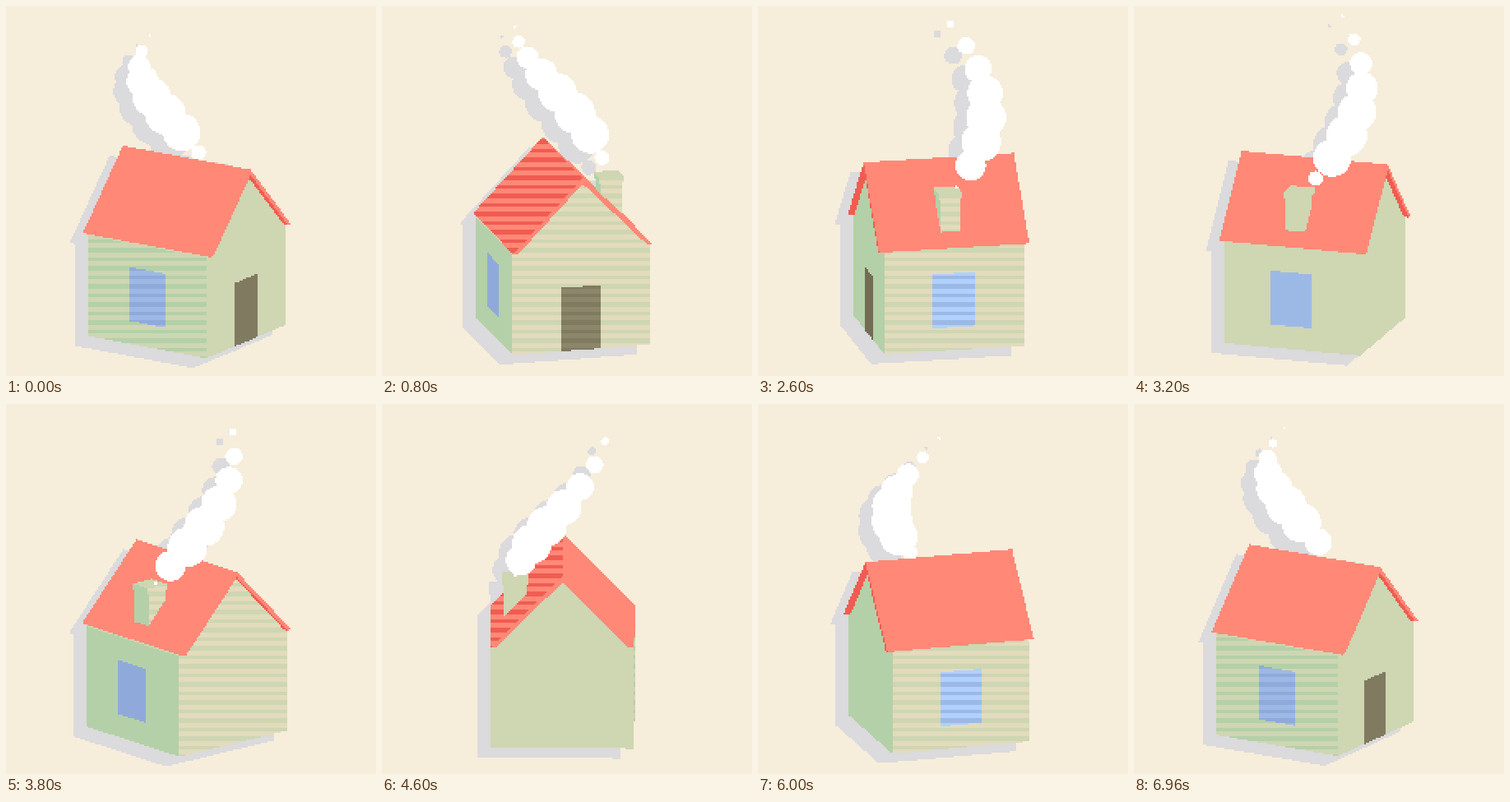
Recreate the animation shown at these times as an HTML page with a canvas. Size 450 px wide and 450 px high, loop 7 s.

```html
<!DOCTYPE html>
<html>
<head>
<meta charset="utf-8">
<title>Little house</title>
<style>
  html, body { margin: 0; width: 100%; height: 100%; overflow: hidden; background: #f6eddb; }
  canvas { display: block; width: 450px; height: 450px; image-rendering: pixelated; }
</style>
</head>
<body>
<canvas id="view" width="225" height="225"></canvas>
<script>
const LOOP = 7000, STEP = 40, PX = 2, N = 225;
const CX = 219.8, CY = 394.5, TILT = 0.28, UP = 0.96;
const STRIPE = 11, STRIPE_SHIFT = 2.75;
const TURN = 2 * Math.PI / LOOP, START = 56.2 * Math.PI / 180;
const LIGHT = 28 * Math.PI / 180;

const rgb = hex => {
  const n = parseInt(hex, 16);
  return (255 << 24 | (n & 255) << 16 | (n & 0xff00) | n >> 16) >>> 0;
};
const BG = rgb('f6eddb'), SHADOW = rgb('dbdadc'), WHITE = rgb('ffffff');
// dark, middle, light
const WALL = ['b4d0a8', 'ced6b2', 'e2dbbc'].map(rgb);
const GLASS = ['8faada', '9cb9e6', 'b0d0fd'].map(rgb);
const DOOR = ['736c54', '807a60', '8c866a'].map(rgb);
const ROOF = ['f05c51', 'ff8877'].map(rgb);

const ctx = document.getElementById('view').getContext('2d');
const image = ctx.createImageData(N, N);
const out = new Uint32Array(image.data.buffer);
const color = new Uint32Array(N * N);
const depth = new Float32Array(N * N);

let sinA, cosA;

// u runs along the ridge, v across it, h is height on screen
function project([u, v, h]) {
  const d = u * cosA - v * sinA;
  return {
    x: (CX + u * sinA + v * cosA) / PX - 0.5,
    y: (CY + TILT * d - h) / PX - 0.5,
    z: UP * d + TILT / UP * h
  };
}

function plot(x, y, z, c) {
  const i = y * N + x;
  if (z > depth[i]) { depth[i] = z; color[i] = c; }
}

const clampLo = n => Math.max(0, Math.ceil(n));
const clampHi = n => Math.min(N - 1, Math.floor(n));

function triangle(a, b, c, even, odd) {
  const area = (b.x - a.x) * (c.y - a.y) - (c.x - a.x) * (b.y - a.y);
  if (Math.abs(area) < 1e-6) return;
  const x0 = clampLo(Math.min(a.x, b.x, c.x)), x1 = clampHi(Math.max(a.x, b.x, c.x));
  const y0 = clampLo(Math.min(a.y, b.y, c.y)), y1 = clampHi(Math.max(a.y, b.y, c.y));
  for (let y = y0; y <= y1; y++) {
    const tone = ((y + 0.5) * PX + STRIPE_SHIFT) % STRIPE < STRIPE / 2 ? odd : even;
    for (let x = x0; x <= x1; x++) {
      const p = ((x - a.x) * (c.y - a.y) - (c.x - a.x) * (y - a.y)) / area;
      const q = ((b.x - a.x) * (y - a.y) - (x - a.x) * (b.y - a.y)) / area;
      if (p < -1e-6 || q < -1e-6 || p + q > 1.000001) continue;
      plot(x, y, a.z + p * (b.z - a.z) + q * (c.z - a.z), tone);
    }
  }
}

// Half steps between two tones become stripes.
function tones([nu, nv, nh], pal) {
  const side = (nu * sinA + nv * cosA) * Math.sin(LIGHT) + (nu * cosA - nv * sinA) * Math.cos(LIGHT);
  let level;
  if (pal === ROOF) {
    const lit = 0.707 * (side + nh);
    level = lit > 0.45 ? 2 : lit > 0.1 ? 1 : 0;
  } else if (nh) level = 2;
  else level = side > 0.927 ? 3 : side > 0.66 ? 2 : side > 0.39 ? 1 : 0;
  return [pal[Math.ceil(level / 2)], pal[Math.floor(level / 2)]];
}

function face(points, normal, pal) {
  const p = points.map(project), [even, odd] = tones(normal, pal);
  for (let i = 2; i < p.length; i++) triangle(p[0], p[i - 1], p[i], even, odd);
}

const gableRect = (u, v0, v1, h0, h1) => [[u, v0, h0], [u, v1, h0], [u, v1, h1], [u, v0, h1]];
const sideRect = (v, u0, u1, h0, h1) => [[u0, v, h0], [u1, v, h0], [u1, v, h1], [u0, v, h1]];

function box(u0, u1, v0, v1, h0, h1) {
  for (const s of [-1, 1]) {
    face(gableRect(s > 0 ? u1 : u0, v0, v1, h0, h1), [s, 0, 0], WALL);
    face(sideRect(s > 0 ? v1 : v0, u0, u1, h0, h1), [0, s, 0], WALL);
  }
  face([[u0, v0, h1], [u1, v0, h1], [u1, v1, h1], [u0, v1, h1]], [0, 0, 1], WALL);
}

function house() {
  box(-87, 87, -87, 87, 0, 122);
  for (const s of [-1, 1]) {
    face([[s * 87, -87, 122], [s * 87, 87, 122], [s * 87, 0, 207]], [s, 0, 0], WALL);
    face(sideRect(s * 87.5, -26, 27, 28, 93.5), [0, s, 0], GLASS);
    roofSide(s);
  }
  face(gableRect(87.4, -25, 23.5, 0, 77), [1, 0, 0], DOOR);
  box(-11.5, 13.5, 44.5, 71.5, 120, 180);
  box(-13.5, 16, 42.5, 73.5, 179, 186);
}

function roofSide(s) {
  const end = 93.5;
  const profile = [[0, 210], [87.5, 124], [81, 124], [0, 203.5]];
  const at = (u, i) => [u, s * profile[i][0], profile[i][1]];
  const strip = (i, j, n) => face([at(-end, i), at(end, i), at(end, j), at(-end, j)], n, ROOF);
  strip(0, 1, [0, 0.7 * s, 0.7]);
  strip(1, 2, [0, 0, -1]);
  strip(2, 3, [0, -0.7 * s, -0.7]);
  for (const e of [-1, 1]) face([0, 1, 2, 3].map(i => at(e * end, i)), [e, 0, 0], ROOF);
}

// age in ms, radius in px
const PUFF = [[0, 0], [175, 2], [375, 9], [575, 18.5], [800, 23.5], [1200, 25],
  [1600, 23.5], [1975, 19.5], [2375, 13.5], [2775, 7.5], [3175, 2], [3450, 0]];

function puffRadius(age) {
  const i = PUFF.findIndex(p => p[0] > age);
  if (i < 1) return 0;
  const [a, r] = PUFF[i - 1], [b, s] = PUFF[i];
  return r + (s - r) * (age - a) / (b - a);
}

function puff(az, age) {
  const r = puffRadius(age) / PX, a = az + age * TURN;
  const d = 58 * Math.cos(a), h = 178.3 + 0.06 * age;
  const x = (CX + 58 * Math.sin(a)) / PX - 0.5, y = (CY + TILT * d - h) / PX - 0.5;
  const z = UP * d + TILT / UP * h;
  for (let j = clampLo(y - r); j <= clampHi(y + r); j++)
    for (let i = clampLo(x - r); i <= clampHi(x + r); i++) {
      const k = r * r - (i - x) ** 2 - (j - y) ** 2;
      if (k >= 0) plot(i, j, z + PX * Math.sqrt(k), WHITE);
    }
}

function render(t) {
  const a = START - t * TURN;
  sinA = Math.sin(a);
  cosA = Math.cos(a);
  color.fill(0);
  depth.fill(-1e9);
  house();
  for (let age = (t + 375) % 400; age < 3450; age += 400) puff(a + Math.PI / 2, age);

  for (let y = 0; y < N; y++)
    for (let x = 0; x < N; x++) {
      const i = y * N + x;
      const shaded = x + 8 < N && y >= 6 && color[i + 8 - 6 * N];
      out[i] = color[i] || (shaded ? SHADOW : BG);
    }
  ctx.putImageData(image, 0, 0);
}

const begin = performance.now();
let last = -1;
function tick() {
  const t = Math.floor((performance.now() - begin) % LOOP / STEP) * STEP;
  if (t !== last) render(last = t);
  requestAnimationFrame(tick);
}
tick();
</script>
</body>
</html>
```
